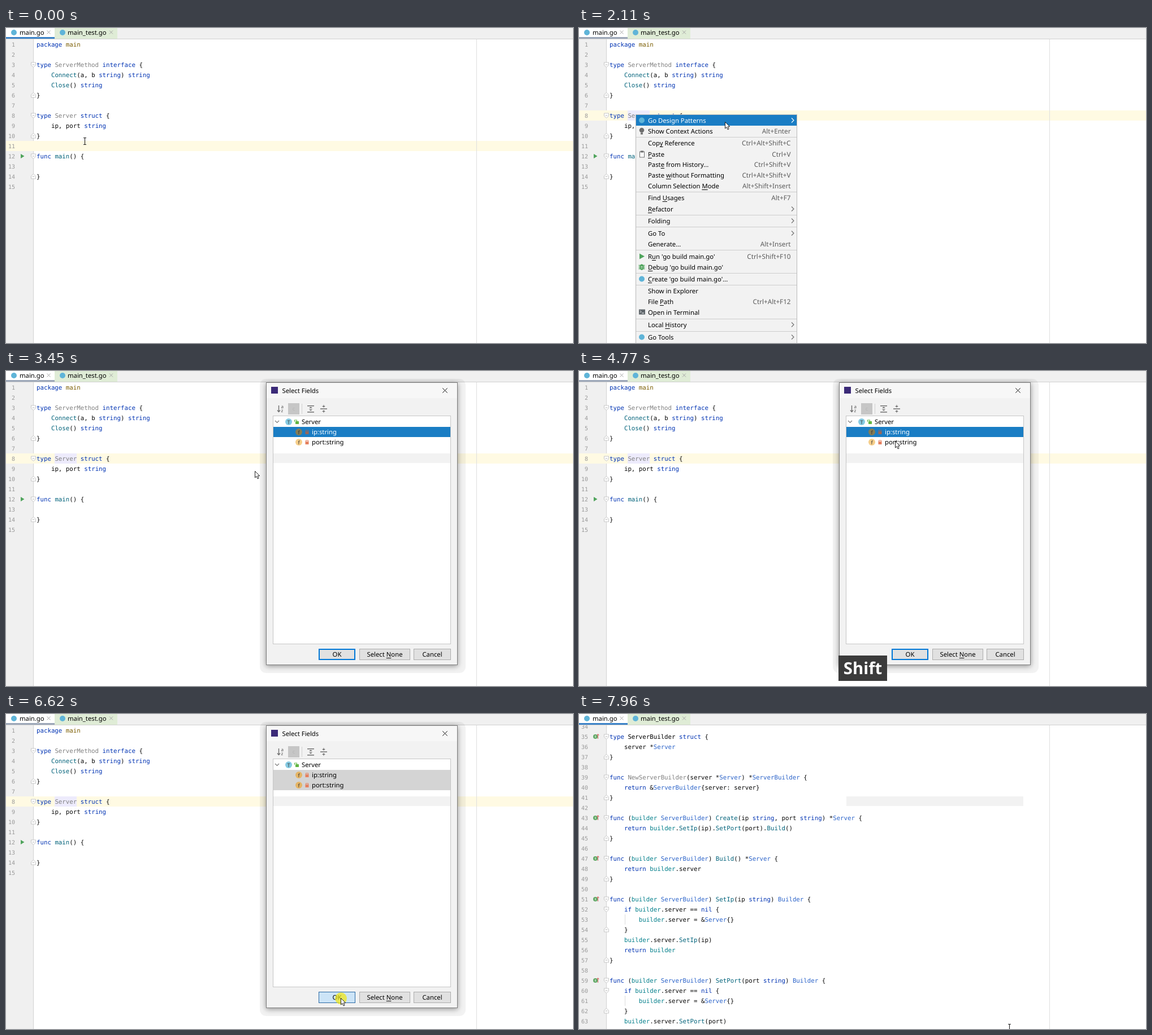
An HTML page with a canvas that plays this animation: 1003 by 558 pixels, repeating every 8 s.

```html
<!DOCTYPE html>
<html lang="en">
<head>
<meta charset="utf-8">
<title>Builder generation in a Go editor</title>
<style>
html, body { margin: 0; width: 100%; height: 100%; overflow: hidden; background: #fff; }
canvas { display: block; }
</style>
</head>
<body>
<canvas id="stage" width="1003" height="558"></canvas>
<script>
const ctx = document.getElementById('stage').getContext('2d');
const LOOP = 8000, STEP = 78, COL = 6.478, LEFT = 54;
const MONO = '10.76px "DejaVu Sans Mono", monospace';
const UI = '11.3px "Noto Sans", "Open Sans", sans-serif';
const KEYS = '11.7px "Noto Sans", "Open Sans", sans-serif';
const BLUE = '#1a7dc4', GOPHER = '#5fb4d8', GREEN = '#4fa45c';

const startCode = `package main

type ServerMethod interface {
    Connect(a, b string) string
    Close() string
}

type Server struct {
    ip, port string
}

func main() {

}
`.split('\n');

const setter = (name, arg) => `func (builder ServerBuilder) ${name}(${arg} string) Builder {
    if builder.server == nil {
        builder.server = &Server{}
    }
    builder.server.${name}(${arg})
    return builder
}
`;
const builtCode = `
type ServerBuilder struct {
    server *Server
}

func NewServerBuilder(server *Server) *ServerBuilder {
    return &ServerBuilder{server: server}
}

func (builder ServerBuilder) Create(ip string, port string) *Server {
    return builder.SetIp(ip).SetPort(port).Build()
}

func (builder ServerBuilder) Build() *Server {
    return builder.server
}

${setter('SetIp', 'ip')}
${setter('SetPort', 'port')}`.split('\n');

// Menu rows: centre y, label (& marks the mnemonic), shortcut or '>', icon
const menu = [
  [164, 'Go Design Patterns', '>', 'dot'], [183, 'Show Context Actions', 'Alt+Enter', 'bulb'],
  [204, 'Cop&y Reference', 'Ctrl+Alt+Shift+C'], [224, '&Paste', 'Ctrl+V', 'clip'],
  [242, 'Past&e from History...', 'Ctrl+Shift+V'], [261, 'Paste &without Formatting', 'Ctrl+Alt+Shift+V'],
  [280, 'Column Selection &Mode', 'Alt+Shift+Insert'], [301, 'Find &Usages', 'Alt+F7'],
  [321, '&Refactor', '>'], [342, 'Folding', '>'], [364, 'Go To', '>'],
  [383, 'Generate...', 'Alt+Insert'], [405, "R&un 'go build main.go'", 'Ctrl+Shift+F10', 'run'],
  [424, "&Debug 'go build main.go'", '', 'bug'], [445, "&Create 'go build main.go'...", '', 'dot'],
  [466, 'Show in Explorer', ''], [485, 'File &Path', 'Ctrl+Alt+F12'],
  [504, 'Open in Terminal', '', 'term'], [526, 'Local &History', '>'], [548, 'Go Tools', '>', 'dot']
];
const rules = [193, 290, 331, 352, 393, 434, 455, 515, 537];
const patterns = ['Singleton', 'Builder', 'Factory', 'Prototype', 'Options'];

// Pointer path: step number, x, y
const path = [
  [0, 139, 200], [3, 139, 200], [4, 124, 186], [5, 124, 186], [6, 120, 165], [8, 109, 136],
  [10, 100, 150], [12, 100, 150], [13, 100, 153], [23, 100, 153], [24, 128, 157], [27, 258, 166],
  [29, 345, 166], [31, 399, 160], [32, 399, 160], [33, 425, 162], [35, 440, 170], [37, 440, 170],
  [38, 440, 177], [46, 440, 177], [47, 463, 170], [49, 521, 146], [50, 551, 128], [51, 551, 128],
  [53, 559, 124], [62, 559, 124], [69, 582, 130], [71, 582, 130], [72, 583, 150], [74, 587, 240],
  [77, 590, 373], [80, 592, 470], [82, 592, 503], [95, 592, 503], [96, 612, 512], [102, 761, 555]
];

const within = (t, a, b) => t >= a && t < b;

function pointerAt(t) {
  const k = Math.floor((t + 12) / STEP);
  const i = path.findIndex(p => p[0] >= k);
  if (i < 0) return path[path.length - 1].slice(1);
  if (i === 0) return path[0].slice(1);
  const [a, ax, ay] = path[i - 1], [b, bx, by] = path[i], u = (k - a) / (b - a);
  return [Math.round(ax + (bx - ax) * u), Math.round(ay + (by - ay) * u)];
}

function box(x, y, w, h, fill, stroke) {
  if (fill) { ctx.fillStyle = fill; ctx.fillRect(x, y, w, h); }
  if (stroke) {
    ctx.strokeStyle = stroke; ctx.lineWidth = 1;
    ctx.strokeRect(x + .5, y + .5, w - 1, h - 1);
  }
}

function disc(x, y, r, fill) {
  ctx.fillStyle = fill;
  ctx.beginPath(); ctx.arc(x, y, r, 0, 7); ctx.fill();
}

// Polyline from a flat list of coordinates
function shape(pts, fill, stroke, width = 1, close = true) {
  ctx.beginPath();
  for (let i = 0; i < pts.length; i += 2) ctx.lineTo(pts[i], pts[i + 1]);
  if (close) ctx.closePath();
  if (fill) { ctx.fillStyle = fill; ctx.fill(); }
  if (stroke) { ctx.strokeStyle = stroke; ctx.lineWidth = width; ctx.stroke(); }
}
const line = (pts, color, width = 1) => shape(pts, null, color, width, false);

function text(s, x, y, color = '#000', font = UI, align = 'left') {
  ctx.font = font; ctx.fillStyle = color; ctx.textAlign = align;
  ctx.fillText(s, x, y);
}

function label(s, x, y, color = '#000') {
  const i = s.indexOf('&'), plain = s.replace('&', '');
  text(plain, x, y, color);
  if (i < 0) return;
  const a = ctx.measureText(plain.slice(0, i)).width;
  const w = ctx.measureText(plain[i]).width;
  box(x + a, y + 2, w, 1, color);
}

function cross(x, y, r, color) {
  line([x - r, y - r, x + r, y + r], color);
  line([x - r, y + r, x + r, y - r], color);
}

function wordColor(word, before, after, built) {
  if (/^(package|type|interface|struct|func|string|return|if|nil)$/.test(word)) return '#0033b3';
  if (before === 'package ') return '#7a5c00';
  if (before === 'type ') return built ? '#000' : '#808080';
  if (word === 'NewServerBuilder') return '#808080';
  if (word === 'builder') return '#007e8a';
  if (after[0] === '(') return '#00627a';
  if (/^(Server|ServerBuilder|Builder)$/.test(word)) return '#2b63c9';
  return '#080808';
}

function codeLine(s, y, built) {
  for (const m of s.matchAll(/\w+|[^\w\s]/g)) {
    const end = m.index + m[0].length;
    text(m[0], LEFT + m.index * COL, y + 4, wordColor(m[0], s.slice(0, m.index), s.slice(end), built), MONO);
  }
}

function foldMark(x, y, up) {
  const d = up ? -1 : 1;
  shape([x - 4, y - 4 * d, x + 4, y - 4 * d, x + 4, y + d, x, y + 4.5 * d, x - 4, y + d], '#fff', '#c6c6c6');
  line([x - 2, y, x + 2, y], '#b5b5b5');
}

function editor(t) {
  const built = t >= 7240, lines = built ? builtCode : startCode;
  const first = built ? 34 : 1, top = built ? 22 : 29;
  const active = !within(t, 1640, 3210) && !within(t, 3290, 7170);
  box(0, 0, 1003, 558, '#fff');
  box(0, 20, 48, 538, '#f0f0f0');
  box(48, 20, 1, 538, '#d3d3d3');
  if (!built) {
    const y = t < 1010 ? 200 : 146;
    box(0, y, 1003, 18, '#fffae3');
    if (t >= 1400) box(86, 146, 39, 18, '#edebfc');
  }
  box(832, 20, 1, 538, '#dedede');

  lines.forEach((s, i) => {
    const y = top + 18 * i;
    if (y > 570 || (built && i === lines.length - 1)) return;
    text(first + i, 16, y + 4, '#999', '10px "DejaVu Sans Mono", monospace', 'right');
    codeLine(s, y, built);
    const opens = /\{$/.test(s), ends = /^\s*\}$/.test(s);
    if (opens || ends) foldMark(48.5, y, ends);
    if (/^ {8}/.test(s)) box(81, y - 9, 1, 18, '#dcdcdc');
    if (built && t >= 7490 && /^(type|func \()/.test(s)) {
      disc(29, y, 4, '#62aa68');
      box(28.5, y - 2, 1, 4, '#fff');
      line([33.5, y + 4, 33.5, y - 4], '#d4605c');
      line([31.5, y - 2, 33.5, y - 4.5, 35.5, y - 2], '#d4605c');
    }
    if (s.startsWith('func main')) shape([26, y - 4, 32.5, y, 26, y + 4], GREEN);
  });
  if (within(t, 310, 700)) box(54, 200, 1, 17, '#000');
  if (within(t, 1010, 1570)) box(99, 147, 1.5, 16, '#000');
  // Leftover stripe where the list stood
  if (built) box(473, 146, 313, 17, '#f2f2f2');

  box(0, 0, 1003, 19, '#f0f0f0');
  box(0, 19, 1003, 1, '#d1d1d1');
  box(0, 0, 86, 19, '#fff');
  box(86, 0, 111, 19, '#dfecd6');
  box(0, 16, 86, 3, active ? '#3c83c8' : '#9ca7b8');
  disc(14, 8, 5, GOPHER);
  disc(100, 8, 5, GOPHER);
  text('main.go', 24, 12);
  text('main_test.go', 109, 12);
  cross(75.5, 7.5, 3, '#a5a5a5');
  cross(186, 7.5, 3, '#a5a5a5');
}

function icon(kind, x, y) {
  if (kind === 'dot') disc(x, y, 5, GOPHER);
  if (kind === 'run') shape([x - 4, y - 5, x + 5, y, x - 4, y + 5], GREEN);
  if (kind === 'bulb') {
    disc(x, y - 1.5, 4.3, '#6e6e6e');
    box(x - 2, y + 3, 4, 3, '#6e6e6e');
  }
  if (kind === 'clip') {
    box(x - 4, y - 5, 9, 11, '#fff', '#6e6e6e');
    box(x - 2, y - 6, 5, 3, '#6e6e6e');
  }
  if (kind === 'term') {
    box(x - 5, y - 5, 11, 9, '#5f666b');
    line([x - 3, y - 3, x - 1, y - 1, x - 3, y + 1], '#fff');
    line([x, y + 1.5, x + 4, y + 1.5], '#fff');
  }
  if (kind === 'bug') {
    for (const d of [-3, 0, 3]) line([x - 5.5, y + d, x + 5.5, y + d], GREEN, 1.4);
    ctx.fillStyle = GREEN;
    ctx.beginPath(); ctx.ellipse(x, y, 3.6, 5.3, 0, 0, 7); ctx.fill();
    box(x - 1.5, y - 1.5, 3, 1, '#f2f2f2');
    box(x - 1.5, y + 1, 3, 1, '#f2f2f2');
  }
}

const chevron = (x, y, color) => line([x - 2, y - 4, x + 2, y, x - 2, y + 4], color, 1.1);

function submenu(x, y, w, items, hot, arrows) {
  box(x, y, w, items.length * 19 + 2, '#f2f2f2', '#bcbcbc');
  items.forEach((s, i) => {
    const cy = y + 10.5 + 19 * i, on = i === hot, color = on ? '#fff' : '#000';
    if (on) box(x + 1, cy - 9.5, w - 2, 19, BLUE);
    text(s, x + 20, cy + 4, color);
    if (i < arrows) chevron(x + w - 8, cy, on ? '#fff' : '#6e6e6e');
  });
}

function contextMenu(t, mx) {
  box(100, 153, 286, 420, '#f2f2f2', '#b8b8b8');
  const hot = mx > 101;
  if (hot) box(101, 154, 284, 19, BLUE);
  for (const y of rules) box(101, y, 284, 1, '#cdcdcd');
  menu.forEach(([y, name, key, kind], i) => {
    const on = hot && i === 0;
    if (kind) icon(kind, 111, y - .5);
    label(name, 122, y + 4, on ? '#fff' : '#000');
    if (key === '>') chevron(378, y - .5, on ? '#fff' : '#6e6e6e');
    else if (key) text(key, 374.5, y + 4, '#5a5a5a', KEYS, 'right');
  });
  if (t >= 2260) submenu(385, 151, 89, patterns, t >= 2970 ? 1 : t >= 2420 ? 0 : -1, 1);
  if (within(t, 2660, 2970)) submenu(473, 149, 130, ['Hungry Singleton', 'Lazy Singleton'], -1, 0);
}

function badge(x, y, letter, fill) {
  disc(x, y, 6, fill);
  text(letter, x, y + 3.5, '#333', '9px "Noto Sans", sans-serif', 'center');
}

function lock(x, y, color, open) {
  box(x - 3, y - 1, 6, 5, color);
  const s = open ? -2.5 : 0;
  line([x - 2 + s, y, x - 2 + s, y - 3, x + 2 + s, y - 3, x + 2 + s, y - 1], color, 1.1);
}

function button(x, w, name, fill, stroke) {
  box(x, 492, w, 20, fill, stroke);
  ctx.font = UI;
  label(name, x + (w - ctx.measureText(name.replace('&', '')).width) / 2, 506);
}

function toolbar() {
  line([482.5, 61, 482.5, 72], '#6e6e6e', 1.4);
  line([480, 69.5, 482.5, 72.5, 485, 69.5], '#6e6e6e', 1.4);
  text('a', 486.5, 66, '#555', '8px "Noto Sans", sans-serif');
  text('z', 486.5, 73, '#555', '8px "Noto Sans", sans-serif');
  box(499, 57, 20, 20, '#c6c6c6');
  text('c', 509, 70, '#b4b4b4', '9px "Noto Sans", sans-serif', 'center');
  box(523, 58, 1, 18, '#cfcfcf');
  for (const [x, d] of [[539, 1], [562, -1]]) {
    if (d > 0) { box(x - 6, 61, 12, 1.5, '#6e6e6e'); box(x - 6, 72, 12, 1.5, '#6e6e6e'); }
    else box(x - 6, 66.3, 12, 1.5, '#6e6e6e');
    const a = d > 0 ? 63.5 : 64.5, b = d > 0 ? 70.5 : 69.5;
    shape([x - 3, a + 2.6 * d, x + 3, a + 2.6 * d, x, a], '#6e6e6e');
    shape([x - 3, b - 2.6 * d, x + 3, b - 2.6 * d, x, b], '#6e6e6e');
    if (d < 0) { box(x - .5, 60, 1, 3, '#6e6e6e'); box(x - .5, 71, 1, 3, '#6e6e6e'); }
  }
}

function dialog(t) {
  ctx.fillStyle = 'rgba(0,0,0,.05)';
  ctx.beginPath(); ctx.roundRect(449, 14, 364, 521, 11); ctx.fill();
  ctx.save();
  ctx.shadowColor = 'rgba(0,0,0,.4)'; ctx.shadowBlur = 9; ctx.shadowOffsetY = 2;
  box(460, 20, 339, 501, '#f2f2f2');
  ctx.restore();
  box(460, 20, 339, 501, '#f2f2f2', '#7d7d7d');
  box(461, 21, 337, 27, '#f7f7f7');
  box(469, 28, 12, 12, '#3b2a78');
  text('Select Fields', 488.5, 39);
  cross(776.5, 34.5, 4.2, '#111');
  toolbar();

  box(472, 79, 315, 405, '#fff', '#c6c6c6');
  box(473, 146, 313, 17, '#f2f2f2');
  line([476, 88, 479.5, 91.5, 483, 88], '#7a7a7a', 1.2);
  badge(500, 90, 'T', '#86cbe3');
  lock(515, 90, '#62b543', true);
  text('Server', 523, 94);
  const pressed = t >= 6470;
  ['ip:string', 'port:string'].forEach((s, i) => {
    const y = 108 + 18 * i, chosen = i === 0 || t >= 5230, lit = chosen && !pressed;
    if (chosen) box(473, y - 9, 313, 18, pressed ? '#d4d4d4' : BLUE);
    badge(518, y, 'f', lit ? '#857d55' : pressed ? '#e5b566' : '#f6cf8b');
    lock(532.5, y, lit ? '#9a6658' : '#e5805f');
    text(s, 541, y + 4, lit ? '#fff' : '#000');
  });

  button(553, 65, 'OK', pressed ? '#cce4f7' : t >= 6320 ? '#e5f1fb' : '#e1e1e1', pressed ? '#2a6aa5' : '#0078d7');
  if (!pressed) box(554, 493, 63, 18, null, '#0078d7');
  button(625, 90, 'Select &None', '#e1e1e1', '#adadad');
  button(721, 66, 'Cancel', '#e1e1e1', '#adadad');
}

function pointer(x, y, beam) {
  if (beam) {
    line([x + .5, y - 5, x + .5, y + 6], '#222', 1.1);
    line([x - 2, y - 5.5, x + 3, y - 5.5], '#222');
    line([x - 2, y + 6.5, x + 3, y + 6.5], '#222');
    return;
  }
  const arrow = [0, 0, 0, 11.5, 2.6, 9, 4.6, 13.4, 6.6, 12.5, 4.7, 8.3, 8.3, 8.3];
  shape(arrow.map((v, i) => v + (i % 2 ? y : x) + .5), '#fff', '#222');
}

function draw(t) {
  const [x, y] = pointerAt(t);
  editor(t);
  if (within(t, 1640, 3210)) contextMenu(t, x);
  if (within(t, 3290, 7170)) dialog(t);
  if (within(t, 4770, 5930)) {
    box(459, 504, 86, 45, '#3b3b3b');
    text('Shift', 502, 537, '#fff', 'bold 29.3px "Open Sans", "Noto Sans", sans-serif', 'center');
  }
  const clicks = [[1080, 1250], [1400, 1570], [3040, 3210], [5150, 5380], [6470, 7170]];
  if (clicks.some(c => within(t, ...c))) disc(x + .5, y + .8, 10.5, 'rgba(240,230,20,.72)');
  pointer(x, y, t < 1640 || t >= 7170);
}

ctx.textRendering = 'geometricPrecision';
const begin = performance.now();
function frame() {
  draw((performance.now() - begin) % LOOP);
  requestAnimationFrame(frame);
}
frame();
</script>
</body>
</html>
```
